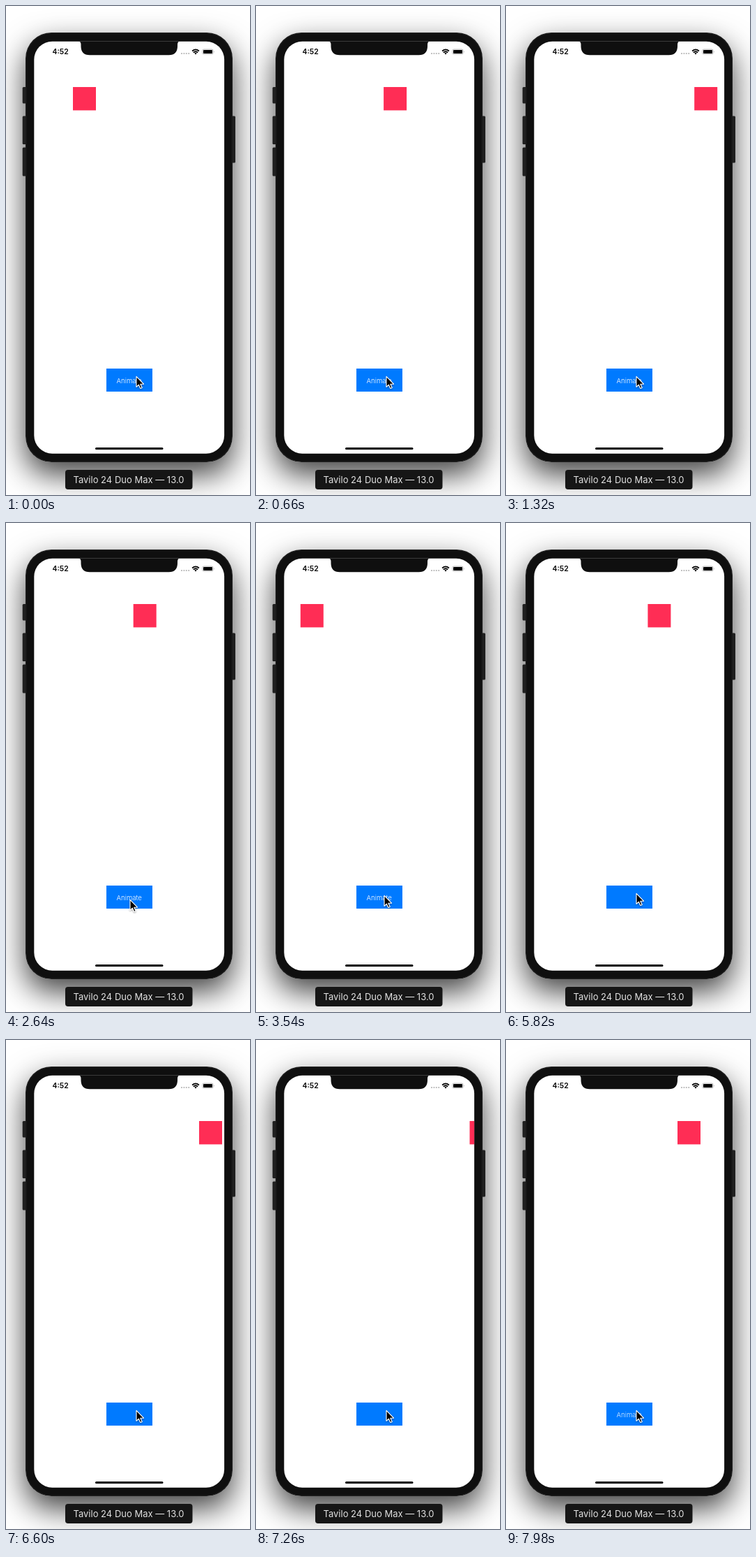
These frames come from a looping animation (350x700 px, 8 s). An HTML page:

```html
<!DOCTYPE html>
<html lang="en">
<head>
<meta charset="utf-8">
<title>Sliding square</title>
<style>
  html, body { margin: 0; width: 100%; height: 100%; overflow: hidden; background: #fff; }
  #stage { position: relative; width: 350px; height: 700px; overflow: hidden; }
  #shadow {
    position: absolute; left: 28px; top: 38px; width: 297px; height: 615px;
    border-radius: 37px; box-shadow: 0 18px 44px rgba(0, 0, 0, .75);
  }
  svg { position: absolute; left: 0; top: 0; display: block; }
  text { font-family: Inter, "Open Sans", sans-serif; }
</style>
</head>
<body>
<div id="stage">
  <div id="shadow"></div>
  <svg width="350" height="700" viewBox="0 0 350 700">
    <defs>
      <clipPath id="screen"><rect x="40.3" y="50.7" width="272.8" height="590" rx="26"/></clipPath>
      <filter id="soft" x="-50%" y="-50%" width="200%" height="200%">
        <feDropShadow dx="0" dy="1" stdDeviation="1" flood-opacity=".4"/>
      </filter>
    </defs>

    <!-- Phone body and side buttons -->
    <g fill="#202020">
      <rect x="23.7" y="116" width="6" height="23.5" rx="1.5"/>
      <rect x="23.7" y="157.5" width="6" height="40.5" rx="1.5"/>
      <rect x="23.7" y="202.5" width="6" height="41" rx="1.5"/>
      <rect x="323" y="157.5" width="6" height="67" rx="1.5"/>
    </g>
    <rect x="28" y="38" width="297" height="615" rx="37" fill="#1c1c1c"/>
    <rect x="29.5" y="39.5" width="294" height="612" rx="35.5" fill="#0f0f0f"/>

    <g clip-path="url(#screen)">
      <rect x="40" y="50" width="274" height="591" fill="#fff"/>
      <rect id="square" y="116" width="33" height="33.4" fill="#ff2d55"/>
      <rect x="144" y="519" width="66" height="33" fill="#007aff"/>
      <text id="label" x="176.7" y="539.9" font-size="9.6" font-weight="300" fill="#fff" text-anchor="middle">Animate</text>
      <rect x="128" y="632" width="97.5" height="3" rx="1.5"/>
      <path d="M103 50 Q107.5 50.5 107.5 55 V57.5 Q107.5 70.2 120 70.2 H233.5 Q246 70.2 246 57.5 V55 Q246 50.5 250.5 50 Z" fill="#0f0f0f"/>
    </g>

    <!-- Status bar -->
    <text x="66.6" y="69.2" font-size="10.4" font-weight="600">4:52</text>
    <path d="M252 68 h11" fill="none" stroke="#b5b5b5" stroke-width="2.2" stroke-linecap="round" stroke-dasharray="0 3.4"/>
    <g fill="none" stroke="#000" stroke-width="1.7">
      <path d="M267.1 64.5 Q272 60.2 276.9 64.5"/>
      <path d="M268.8 66.7 Q272 63.8 275.2 66.7"/>
    </g>
    <path d="M270.3 67.7 Q272 66.3 273.7 67.7 L272 69.4 Z"/>
    <rect x="281.9" y="62" width="15.2" height="7" rx="2" fill="none" stroke="#999" stroke-width=".7"/>
    <rect x="283" y="63.1" width="13" height="4.8" rx="1"/>
    <path d="M298 64.3 q1.3 1.2 0 2.5z" fill="#999"/>

    <!-- Caption -->
    <rect x="85" y="664" width="182.5" height="28" rx="4" fill="#161616"/>
    <text x="176" y="682.5" font-size="13" fill="#e2e2e2" text-anchor="middle">Tavilo 24 Duo Max — 13.0</text>

    <g id="cursor">
      <path d="M0 0 V15 L3.4 11.9 L5.8 17.2 L8.2 16.1 L5.8 10.9 H10.5 Z"
            stroke="#fff" stroke-width="1.1" stroke-linejoin="round" filter="url(#soft)"/>
    </g>
  </svg>
</div>
<script>
  const LOOP = 8000, STEP = 60;
  // Each track lists [time in ms, value], joined by straight lines.
  const squareX = [
    [0, 96], [1649, 313.6], [3717, 40.4], [4000, 77.8], [4560, 115.4], [5820, 203.4],
    [6600, 277], [7150, 313.6], [7500, 291], [7640, 291], [7980, 246], [8000, 243.4]
  ];
  const labelAlpha = [[0, 1], [4000, 1], [4120, 0], [7640, 0], [7980, .85], [8000, .88]];
  const cursorShift = [[0, 0], [2160, 0], [2460, 1], [3300, 1], [3660, 0], [8000, 0]];

  const byId = id => document.getElementById(id);
  const square = byId('square'), label = byId('label'), cursor = byId('cursor');

  function valueAt(track, t) {
    const i = Math.max(1, track.findIndex(([time]) => time >= t));
    const [t0, a] = track[i - 1], [t1, b] = track[i];
    return a + (b - a) * (t - t0) / (t1 - t0);
  }

  function draw() {
    const now = performance.now() % LOOP;
    const t = Math.floor(now / STEP) * STEP;
    const shift = 9 * valueAt(cursorShift, t);
    square.setAttribute('x', valueAt(squareX, t));
    label.setAttribute('opacity', valueAt(labelAlpha, t));
    cursor.setAttribute('transform', `translate(${187 - shift} ${530.3 + shift})`);
    requestAnimationFrame(draw);
  }
  draw();
</script>
</body>
</html>
```
